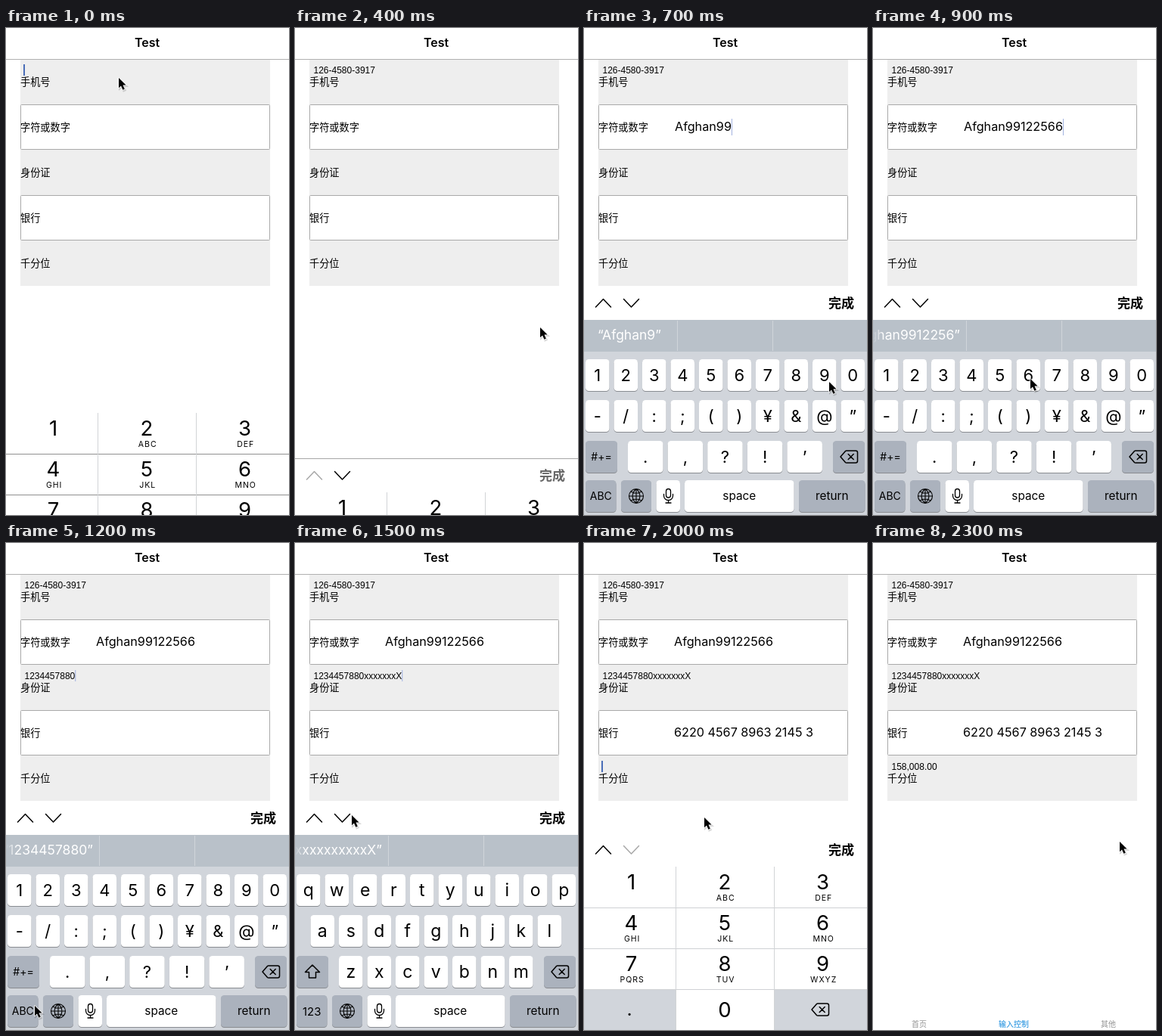
Animation of 374x644 px, one loop 2.4 s. Source, as an HTML page:

```html
<!DOCTYPE html>
<html lang="zh-CN">
<head>
<meta charset="utf-8">
<title>Test</title>
<style>
  html, body { margin: 0; width: 100%; height: 100%; overflow: hidden; background: #fff; }
  svg { display: block; width: 374px; height: 644px; }
  text { font-family: Inter, "Noto Sans CJK SC", "Noto Sans CJK", sans-serif; white-space: pre; }
  .small { font-family: "Liberation Sans", Arial, sans-serif; }
  .cjk { font-family: "Noto Sans CJK SC", "Noto Sans CJK", sans-serif; }
  .icon { fill: none; stroke: #000; stroke-width: 1.5; stroke-linecap: round; stroke-linejoin: round; }
</style>
</head>
<body>
<svg id="stage" viewBox="0 0 374 644">
  <defs>
    <linearGradient id="fade">
      <stop offset="0" stop-color="#b9c1c9"/>
      <stop offset="1" stop-color="#b9c1c9" stop-opacity="0"/>
    </linearGradient>
    <clipPath id="slot"><rect y="386" width="123" height="42"/></clipPath>
  </defs>
</svg>
<script>
const STEP = 100, LOOP = 2400;
const stage = document.getElementById("stage");

function add(parent, tag, attrs = {}, content) {
  const node = document.createElementNS("http://www.w3.org/2000/svg", tag);
  for (const key in attrs) node.setAttribute(key, attrs[key]);
  if (content !== undefined) node.textContent = content;
  parent.appendChild(node);
  return node;
}
const group = parent => add(parent, "g");
const rect = (parent, x, y, width, height, fill, more) =>
  add(parent, "rect", { x, y, width, height, fill, ...more });
const label = (parent, x, y, size, content, more) =>
  add(parent, "text", { x, y, "font-size": size, "text-anchor": "middle", ...more }, content);
const icon = (parent, d, more) => add(parent, "path", { d, class: "icon", ...more });
const show = (node, on) => node.setAttribute("visibility", on ? "visible" : "hidden");
const shift = (node, x, y) => node.setAttribute("transform", `translate(${x} ${y})`);

// Page: title, form rows and tabs
label(stage, 186.5, 25, 16, "Test", { "font-weight": 600 });
rect(stage, 0, 41, 374, 1, "#b0b0b0");
rect(stage, 19, 42, 330, 299, "#eeeeee");

const values = ["126-4580-3917", "Afghan99122566", "1234457880xxxxxxxX",
  "6220 4567 8963 2145 3", "158,008.00"];
const isBig = i => i % 2 === 1;
const inputs = ["手机号", "字符或数字", "身份证", "银行", "千分位"].map((name, i) => {
  const y = 41 + i * 60;
  if (isBig(i)) rect(stage, 19.5, y + .5, 329, 59, "#fff", { stroke: "#a9a9a9", rx: 1 });
  add(stage, "text", { x: 19, y: y + 35, "font-size": 13.2, class: "cjk" }, name);
  return add(stage, "text", isBig(i)
    ? { x: 119, y: y + 95 - 60 + .3 + 60 - 60, "font-size": 16.2 }
    : { x: 24.5, y: y + 19, "font-size": 12, class: "small" });
});
const caret = rect(stage, 0, 0, 1, 15, "#4a6db8");

["首页", "输入控制", "其他"].forEach((name, i) =>
  label(stage, 61 + i * 125, 639.5, 10, name, { class: "cjk", fill: i === 1 ? "#1088dc" : "#929292" }));

// Shared icons
function backspace(parent, x, y) {
  const g = group(parent);
  shift(g, x, y);
  icon(g, "M-11 0L-4.5-7.5Q-4-8-3-8H9Q11.5-8 11.5-5.5V5.5Q11.5 8 9 8H-3Q-4 8-4.5 7.5ZM-.8-3.5L6.2 3.5M6.2-3.5L-.8 3.5");
}

// Numeric pad
const pad = group(stage);
rect(pad, 0, 428, 374, 216, "#fff");
const gray = "#d1d5db";
rect(pad, 0, 590, 121, 54, gray);
rect(pad, 252, 590, 122, 54, gray);
const columns = [62.5, 186, 315.5];
const letters = ["", "ABC", "DEF", "GHI", "JKL", "MNO", "PQRS", "TUV", "WXYZ"];
letters.forEach((sub, i) => {
  const x = columns[i % 3], y = 428 + Math.floor(i / 3) * 54;
  label(pad, x, y + 29.5, 27.5, i + 1);
  label(pad, x + 1.2, y + 45.3, 10.5, sub, { "letter-spacing": 1 });
});
label(pad, 186, 627, 27.5, 0);
const dot = label(pad, 60, 625, 25, ".");
backspace(pad, 312, 617);
const rules = [482, 536, 590].map(y => rect(pad, 0, y, 374, 1));
rect(pad, 121, 428, 1, 216, "#d2d4d6");
rect(pad, 251, 428, 1, 216, "#d2d4d6");

// Full keyboard
const board = group(stage);
rect(board, 0, 386, 374, 258, gray);
rect(board, 0, 386, 374, 42, "#b9c1c9");
rect(board, 123, 387, 1, 40, "#d0d5da");
rect(board, 249, 387, 1, 40, "#d0d5da");
const hintBox = add(board, "g", { "clip-path": "url(#slot)" });
const hint = label(hintBox, 60, 411.5, 17.5, "", { fill: "#fff" });
rect(hintBox, 0, 388, 14, 38, "url(#fade)");

function key(parent, x, y, width, text = "", size = 22, dark = false, base = 29) {
  rect(parent, x, y + 1, width, 42, "#898c91", { rx: 4.5 });
  rect(parent, x, y, width, 42, dark ? "#abb2bd" : "#fff", { rx: 4.5 });
  label(parent, x + width / 2, y + base, size, text);
}
function keyRow(parent, chars, x, y, pitch, width, size) {
  [...chars].forEach((c, i) => key(parent, x + i * pitch, y, width, c, size));
}

key(board, 329, 546, 42, "", 15, true);
backspace(board, 350, 567);
key(board, 49, 598, 40, "", 15, true);
key(board, 95.5, 598, 31.5);
key(board, 133, 598, 144.5, "space", 15.3, false, 26);
key(board, 284, 598, 87.5, "return", 15.3, true, 26);
icon(board, "M59.5 619a9.5 9.5 0 1 0 19 0a9.5 9.5 0 1 0-19 0ZM69 609.5V628.5M59.5 619H78.5"
  + "M69 609.5C62.5 615 62.5 623 69 628.5M69 609.5C75.5 615 75.5 623 69 628.5"
  + "M62 613Q69 617 76 613M62 625Q69 621 76 625", { style: "stroke-width:1.1" });
icon(board, "M108.5 612.5a3 3 0 0 1 6 0V618a3 3 0 0 1-6 0ZM105.5 616.5V618.5a6 6 0 0 0 12 0V616.5"
  + "M111.5 624.5V628M108 628H115", { style: "stroke-width:1.3" });

const abc = group(board);
keyRow(abc, "qwertyuiop", 2, 438, 37.5, 31.5, 23);
keyRow(abc, "asdfghjkl", 20.5, 492, 37.5, 31.5, 23);
keyRow(abc, "zxcvbnm", 58, 546, 37.5, 31.5, 23);
key(abc, 2, 546, 42, "", 15, true);
icon(abc, "M23 558L32.5 567.5H27.5V575H18.5V567.5H13.5Z");
key(abc, 2, 598, 40.5, "123", 15, true, 26.5);

const symbols = group(board);
keyRow(symbols, "1234567890", 2, 438, 37.5, 31.5, 22);
keyRow(symbols, "-/:;()¥&@”", 2, 492, 37.5, 31.5, 22);
keyRow(symbols, ".,?!’", 58, 546, 52.6, 46.5, 22);
key(symbols, 2, 546, 42, "#+=", 14, true, 26);
key(symbols, 2, 598, 40.5, "ABC", 14, true, 26);

// Toolbar, drawn for a keyboard that starts at y = 386
const bar = group(stage);
rect(bar, 0, 342, 374, 44, "#fff");
const barLine = rect(bar, 0, 341, 374, 1, "#a6a6a6");
const up = icon(bar, "M15.5 369L25.5 358.5L35.5 369");
const down = icon(bar, "M52.5 358.5L62.5 369L72.5 358.5");
const done = label(bar, 340, 370, 17, "完成", { class: "cjk", "font-weight": 600 });

// Pointer
const pointer = group(stage);
const arrow = "M0 0V13.2L3 10.4L5.4 15.8L7.8 14.7L5.5 9.5H9.6Z";
add(pointer, "path", { d: arrow, transform: "translate(1 1.6)", fill: "#000", stroke: "#000", "stroke-width": 2, opacity: .15 });
add(pointer, "path", { d: arrow, stroke: "#fff", "stroke-width": 1.6, "stroke-linejoin": "round", "paint-order": "stroke" });

// keyboard, slide, focused field, typed length, pointer x, pointer y, suggestion
const steps = [
  ["pad", 81, 0, 0, 149, 66],
  ["pad", 0, 0, 4, 186, 452],
  ["pad", 0, 0, 10, 190, 506],
  ["pad", 0, 0, 13, 324, 404],
  ["pad", 186, 0, 13, 324, 396],
  ["abc", 0, 1, 0, 196, 140, ""],
  ["abc", 0, 1, 6, 24, 612, "Afghan"],
  ["num", 0, 1, 8, 324, 468, "Afghan9"],
  ["num", 0, 1, 11, 58, 462, "Afghan9912"],
  ["num", 0, 1, 14, 208, 464, "Afghan9912256"],
  ["num", 0, 2, 0, 64, 366, ""],
  ["num", 0, 2, 5, 132, 464, "12344"],
  ["num", 0, 2, 10, 38, 612, "1234457880"],
  ["abc", 0, 2, 13, 112, 570, "1234457880xxx"],
  ["abc", 0, 2, 17, 112, 570, "1234457880xxxxxxx"],
  ["abc", 0, 2, 18, 75, 360, "1234457880xxxxxxxxxxX"],
  ["pad", 0, 3, 4, 186, 452],
  ["pad", 0, 3, 11, 314, 506],
  ["pad", 0, 3, 18, 188, 506],
  ["pad", 0, 3, 21, 316, 452],
  ["pad", 0, 4, 0, 159, 363],
  ["pad", 0, 4, 3, 186, 560],
  ["pad", 0, 4, 10, 330, 404],
  ["", 0, 4, 10, 326, 395]
];

function placeCaret(field, count, visible) {
  show(caret, visible);
  if (!visible) return;
  const big = isBig(field), top = 41 + field * 60;
  const end = inputs[field].getComputedTextLength();
  const box = {
    x: big ? 120 + end : count ? 24.5 + end : 23,
    y: top + (big ? 79 - 60 : 7),
    width: count || big ? 1 : 2,
    height: big ? 22 : 15,
    fill: count || big ? "#9fb0df" : "#4a6db8"
  };
  for (const name in box) caret.setAttribute(name, box[name]);
}

function draw([kind, slide, field, count, x, y, guess]) {
  const onPad = kind === "pad", onBoard = kind === "abc" || kind === "num";
  const closing = slide > 100;

  inputs.forEach((input, i) => {
    input.textContent = i < field ? values[i] : i === field ? values[i].slice(0, count) : "";
    if (isBig(i)) input.setAttribute("x", i === field ? 120 : 119);
  });
  placeCaret(field, count, kind && !closing);

  pad.style.display = onPad ? "" : "none";
  board.style.display = onBoard ? "" : "none";
  abc.style.display = kind === "abc" ? "" : "none";
  symbols.style.display = kind === "num" ? "" : "none";
  shift(pad, 0, slide);
  show(dot, field === 4);
  rules.forEach(r => r.setAttribute("fill", slide ? "#909090" : "#cfd1d4"));

  bar.style.display = kind && (!slide || closing) ? "" : "none";
  shift(bar, 0, onPad ? slide + 42 : 0);
  show(barLine, closing);
  up.style.stroke = field === 0 ? "#a8a8a8" : "#000";
  down.style.stroke = field === 4 ? "#a8a8a8" : "#000";
  done.setAttribute("fill", closing ? "#666" : "#000");

  if (onBoard) {
    hint.textContent = guess && `“${guess}”`;
    const long = hint.getComputedTextLength() > 108;
    hint.setAttribute("x", long ? 115 : 60);
    hint.setAttribute("text-anchor", long ? "end" : "middle");
  }
  shift(pointer, x, y);
}

const start = performance.now();
let current = -1;
function tick() {
  const index = Math.floor((performance.now() - start) % LOOP / STEP);
  if (index !== current) draw(steps[current = index]);
  requestAnimationFrame(tick);
}
tick();
</script>
</body>
</html>
```
